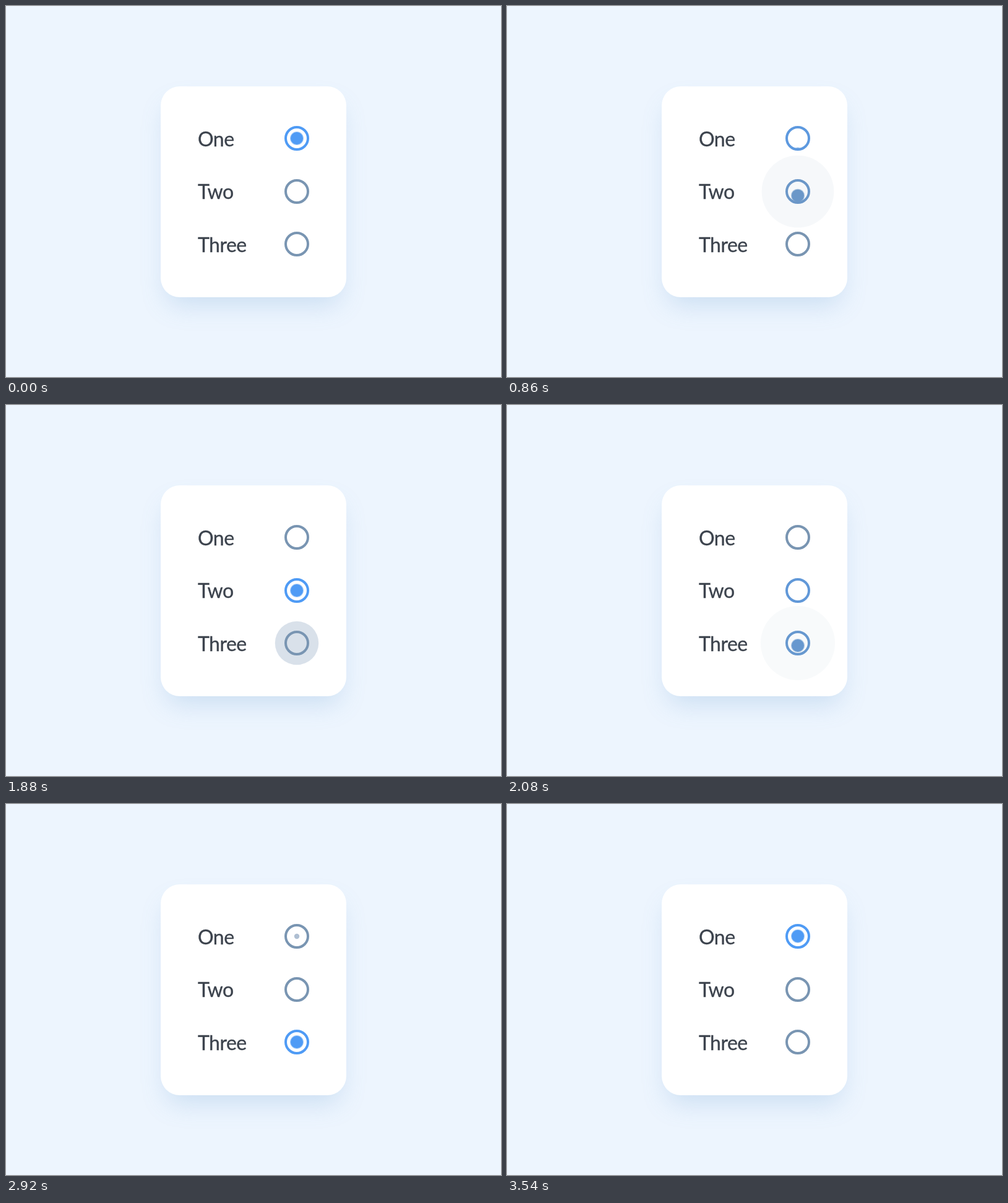
Animation, 800 px wide and 600 px high, one loop 4000 ms. Source, as an HTML page:

```html
<!DOCTYPE html>
<html lang="en">
<head>
<meta charset="utf-8">
<title>Radio buttons</title>
<style>
  html, body { margin: 0; width: 100%; height: 100%; overflow: hidden; background: #edf5fe; }
  .card {
    position: absolute; left: 250px; top: 129.5px; width: 300px; height: 341px;
    border-radius: 31px; background: #fff;
    box-shadow: 0 22px 40px -10px rgba(105, 157, 210, .26);
  }
  svg { position: absolute; left: 0; top: 0; }
  text {
    font: 32px Lato, "Open Sans", sans-serif; letter-spacing: -.5px;
    fill: #3c434d; stroke: #3c434d; stroke-width: .35px;
  }
</style>
</head>
<body>
<div class="card"></div>
<svg width="800" height="600" viewBox="0 0 800 600">
  <clipPath id="inside"><circle r="17"/></clipPath>
  <circle id="ripple" cx="470" fill="#7894b3"/>
  <g id="rows"></g>
</svg>
<script>
const LOOP = 4000, FIRST_TAP = 520, TAP_GAP = 1200;
const GREY = [121, 149, 178], BLUE = [79, 155, 245];
const HIDDEN = 34, OVERSHOOT = -2.5;
const rows = document.getElementById('rows');
const ripple = document.getElementById('ripple');

const radios = [['One', 214, 226.5], ['Two', 300, 311.5], ['Three', 385, 397.5]].map(([label, y, baseline]) => {
  rows.insertAdjacentHTML('beforeend', `<text x="310" y="${baseline}">${label}</text>
    <g transform="translate(470 ${y})">
      <g clip-path="url(#inside)"><g class="dot"><circle r="11" opacity=".5"/><circle r="10"/></g></g>
      <circle class="ring" r="18" fill="none" stroke-width="4"/>
    </g>`);
  const group = rows.lastElementChild;
  return { y, dot: group.querySelector('.dot'), ring: group.querySelector('.ring') };
});

const progress = (t, start, end) => Math.min(1, Math.max(0, (t - start) / (end - start)));
const smooth = u => u * u * (3 - 2 * u);
const outCubic = u => 1 - (1 - u) ** 3;
const mix = (a, b, u) => a + (b - a) * u;

function paint(radio, blueness, dotY) {
  const colour = `rgb(${GREY.map((c, i) => Math.round(mix(c, BLUE[i], blueness)))})`;
  radio.ring.setAttribute('stroke', colour);
  radio.dot.setAttribute('fill', colour);
  radio.dot.setAttribute('transform', `translate(0 ${dotY})`);
  radio.dot.setAttribute('visibility', dotY > 28.5 ? 'hidden' : 'visible');
}

function draw(time) {
  const tap = Math.floor((time - FIRST_TAP) / TAP_GAP);
  const t = time - FIRST_TAP - tap * TAP_GAP;
  const selected = (tap + 1) % 3, previous = (tap + 3) % 3;

  const fade = 1 - progress(t, 0, 506);
  ripple.setAttribute('cy', radios[selected].y);
  ripple.setAttribute('r', mix(66.7, 4, fade ** 1.8));
  ripple.setAttribute('opacity', tap < 0 ? 0 : .6 * fade ** 2);

  const tint = smooth(progress(t, 230, 520));
  const slide = outCubic(progress(t, 230, 530));
  const settle = smooth(progress(t, 535, 640));
  radios.forEach((radio, i) => {
    if (i === selected) paint(radio, tint, mix(HIDDEN, OVERSHOOT, slide) - OVERSHOOT * settle);
    else if (i === previous) paint(radio, 1 - tint, HIDDEN * slide);
    else paint(radio, 0, HIDDEN);
  });
}

const start = performance.now();
function tick() {
  draw((performance.now() - start) % LOOP);
  requestAnimationFrame(tick);
}
tick();
</script>
</body>
</html>
```
